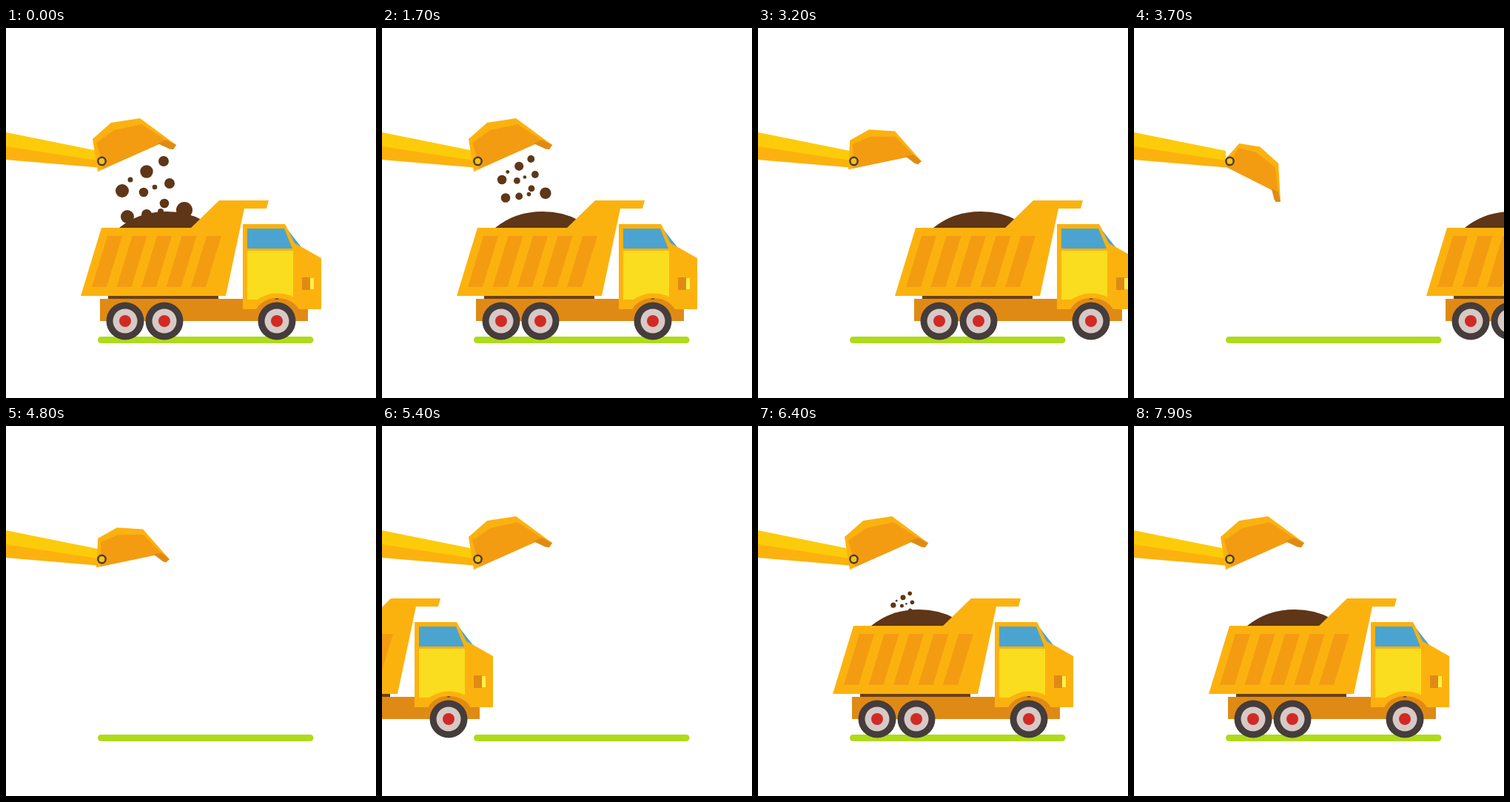
These frames come from a looping animation (500 px wide and 500 px high, 8 s). An HTML page:

```html
<!DOCTYPE html>
<html lang="en">
<head>
<meta charset="utf-8">
<title>Dump truck</title>
<style>
html, body { margin: 0; width: 100%; height: 100%; overflow: hidden; background: #fff; }
svg { display: block; width: 100vw; height: 100vh; }
.amber { fill: #fcb20e; }
.orange { fill: #f39c12; }
.rust { fill: #e08a16; }
.soil { fill: #5f3618; }
.glass { fill: #4ba4d0; }
.lemon { fill: #f9dd1e; }
</style>
</head>
<body>
<svg viewBox="0 0 500 500">
  <path d="M128.500 421.500H411" stroke="#aedb1b" stroke-width="9" stroke-linecap="round"/>

  <path fill="#fccb0a" d="M0 141L124 166V181L0 161Z"/>
  <path class="amber" d="M0 160L124 179V188.500L0 178Z"/>
  <g id="bucket">
    <path class="amber" d="M117 150L142 128L181 122L230 158L226 164L207 156.500L124 194Z"/>
    <path class="orange" d="M122 155L146 138L183 130L216 151L207 157L131 190.500L127 172Z"/>
    <path class="rust" d="M205 156L216 151L230 158L226 164L221 163.500Z"/>
  </g>
  <circle cx="129.500" cy="180" r="5.200" fill="#fcc00c" stroke="#453c38" stroke-width="2.500"/>

  <g id="dirt" class="soil"></g>

  <g id="truck">
    <path class="soil" d="M153 270Q180 248 217 248Q245 248 266 260V270Z"/>
    <path class="rust" d="M127 366H408V396H127Z"/>
    <path fill="#6b4012" d="M138 361H287V366H138Z"/>
    <path class="amber" d="M129 270H250L288 233H355L352 244H322L297 362H101Z"/>
    <g id="stripes" class="orange"></g>

    <path class="amber" d="M320 265H377L391 291L426 311V380H320Z"/>
    <path class="glass" d="M326 271H376L387 298H326ZM381 273L399 296L390 291Z"/>
    <path class="lemon" d="M326 301H388V367H326Z"/>
    <path class="amber" d="M338 368Q352 358.500 366 358.500Q379 358.500 389 364V368Z"/>
    <path class="rust" d="M338 380.500Q347 365 366 365Q387 365 396 380.500Z"/>
    <path class="rust" d="M400 337H411V354H400Z"/>
    <path fill="#fff04a" d="M411 338H416V353H411Z"/>
    <path class="soil" d="M363 366.500Q366 363.500 369 366.500Z"/>
    <g id="wheels"></g>
  </g>
</svg>
<script>
const LOOP = 8000, STEP = 100;
const $ = id => document.getElementById(id);
const circle = (x, y, r, fill) =>
  `<circle cx="${x}" cy="${y}" r="${r}"${fill ? ` fill="${fill}"` : ''}/>`;

$('dirt').innerHTML = [
  [157, 220, 9], [168, 205, 3.5], [190, 194, 8.7], [213, 180, 7],
  [186, 222, 6.3], [201, 215, 3.3], [221, 210, 7], [214, 237, 6.3],
  [164, 255, 9], [190, 252, 7], [209, 248, 4], [241, 246, 11]
].map(c => circle(...c)).join('');

$('stripes').innerHTML = [0, 1, 2, 3, 4].map(i =>
  `<path d="M${137 + i * 33.5} 281h20l-21 69h-20z"/>`).join('');

$('wheels').innerHTML = [161, 214, 366].map(x =>
  circle(x, 396, 25.5, '#453c3c') + circle(x, 396, 16.5, '#d6c9c6') +
  circle(x, 396, 8, '#d02a25')).join('');

// Seconds; 1 at the peak, falling linearly to 0 one second either side.
const peak = (t, at) => Math.max(0, 1 - Math.abs(t - at));
const about = (x, y, m) => `translate(${x} ${y}) ${m} translate(${-x} ${-y})`;

function draw(t) {
  // The soil shrinks to the bucket at first, later into the load.
  const size = peak(t, 0) + peak(t, 2) + peak(t, 7);
  const pivot = t < 2 ? [174, 170] : [200, 257];
  $('dirt').setAttribute('transform', about(...pivot, `scale(${size})`));

  // Bucket corners travel straight between the two rotated poses.
  const k = peak(t, 4), turn = 70 * Math.PI / 180;
  const a = 1 - k + k * Math.cos(turn), b = k * Math.sin(turn);
  $('bucket').setAttribute('transform', about(129, 180, `matrix(${a} ${b} ${-b} ${a} 0 0)`));

  const x = t < 3 || t >= 6 ? 0
    : t < 4 ? 420 * (t - 3)
    : t < 5 ? -460
    : 460 * (t - 6);
  $('truck').setAttribute('transform', `translate(${x} 0)`);
}

function tick() {
  draw(Math.floor(performance.now() % LOOP / STEP) * STEP / 1000);
  requestAnimationFrame(tick);
}
tick();
</script>
</body>
</html>
```
